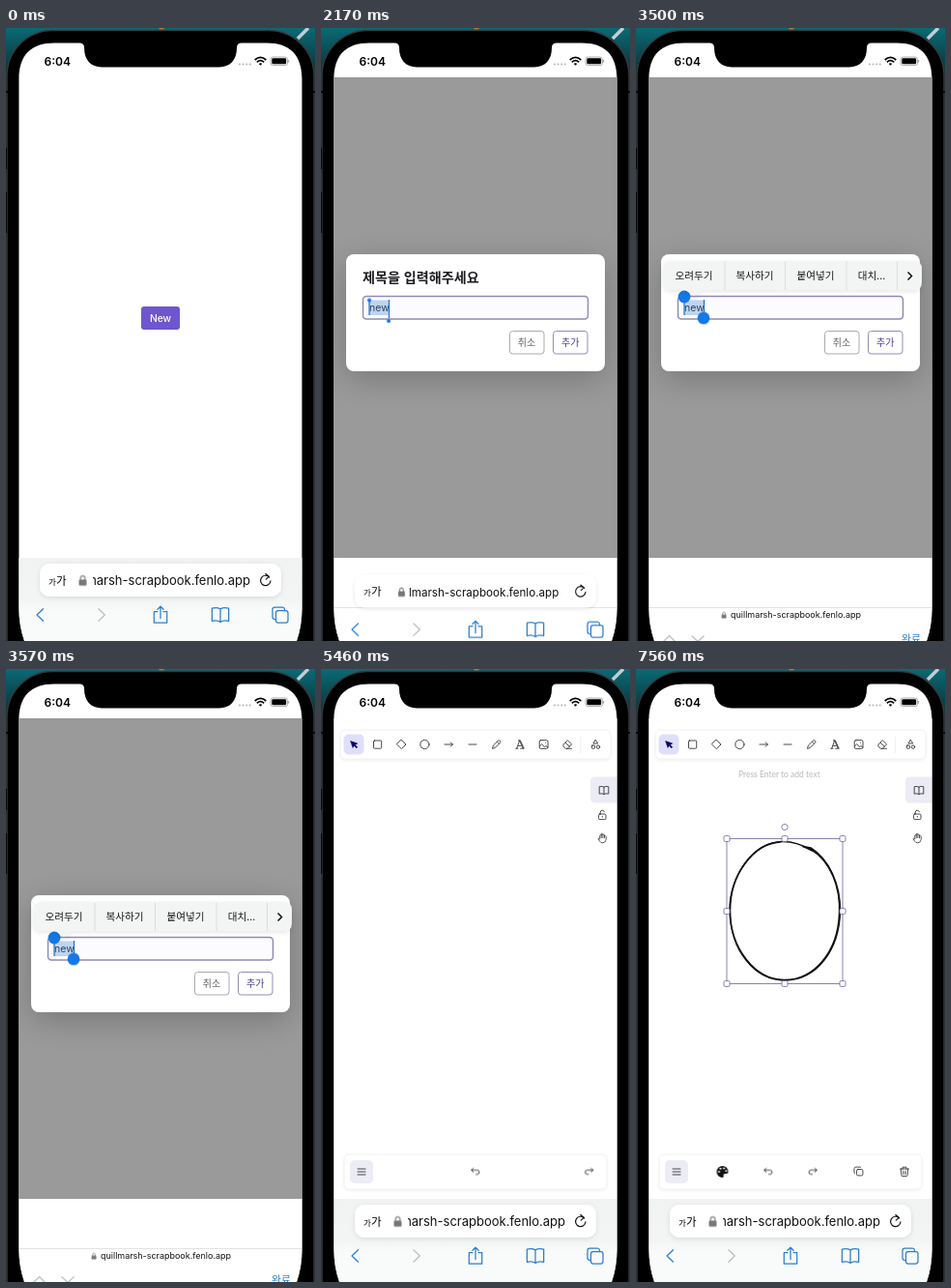
Recreate the animation shown at these times as an HTML page. Size 320 by 634 pixels, loop 8 s.

```html
<!DOCTYPE html>
<html lang="ko">
<head>
<meta charset="utf-8">
<title>Notebook demo</title>
<style>
  html, body { margin: 0; width: 100%; height: 100%; overflow: hidden; background: #000; }
  svg { display: block; width: 100vw; height: 100vh; }
  text { font-family: Inter, "Noto Sans CJK KR", "Noto Sans CJK", sans-serif; }
  .ko { font-family: "Noto Sans CJK KR", "Noto Sans CJK", sans-serif; }
  .mid { text-anchor: middle; }
  .line { fill: none; stroke: #2a2a30; stroke-width: .85; stroke-linecap: round; stroke-linejoin: round; }
  .nav { fill: none; stroke: #2a7fd0; stroke-width: 1.25; stroke-linecap: round; stroke-linejoin: round; }

  .anim { animation: 8s linear infinite; }
  .hard { animation: 8s step-end infinite; }

  /* page and dialog */
  .app { animation-name: app; }
  .modal { animation-name: modal; }
  .panel { animation-name: panel; transform-origin: 160px 295px; }
  .pick { animation-name: pick; }
  .grip { animation-name: grip; }
  .menu { animation-name: menu; }
  @keyframes app { 0% { opacity: 0 } 47.25%, 100% { opacity: 1 } }
  @keyframes modal { 0%, 21.875% { opacity: 0 } 24.5%, 44.7% { opacity: 1 } 47.25%, 100% { opacity: 0 } }
  @keyframes panel { 0%, 21.875% { transform: scale(.96) } 24.5%, 100% { transform: none } }
  @keyframes pick { 0% { opacity: 0 } 26.25%, 100% { opacity: 1 } }
  @keyframes grip { 0%, 27.2% { transform: scale(.31) } 31%, 100% { transform: none } }
  @keyframes menu { 0%, 35% { opacity: 0 } 37.5%, 44.7% { opacity: 1 } 45.5%, 100% { opacity: 0 } }

  /* browser bars: 25.75% - 31% collapse, 45% - 48.1% return */
  .plain { animation-name: plain; }
  .field { animation-name: field; }
  .tint { animation-name: tint; }
  .url { animation-name: url; }
  .lock { animation-name: lock; }
  .tools { animation-name: tools; }
  .keys { animation-name: keys; }
  .bar { animation-timing-function: cubic-bezier(.3, .3, .6, 1); }
  @keyframes plain { 0%, 23% { opacity: 0 } 25.75%, 45% { opacity: 1 } 48.1%, 100% { opacity: 0 } }
  @keyframes field { 0%, 25.75%, 48.1%, 100% { transform: none } 31%, 45% { transform: translateY(34px) } }
  @keyframes tint { 0%, 27%, 48.1%, 100% { opacity: 1 } 30%, 45.5% { opacity: 0 } }
  @keyframes url {
    0%, 25.75%, 48.1%, 100% { transform: translate(253px, 576px) }
    31%, 45% { transform: translate(233px, 610.3px) scale(.69) }
  }
  @keyframes lock {
    0%, 25.75%, 48.1%, 100% { transform: translate(79.5px, 571.5px) }
    31%, 45% { transform: translate(91px, 607.3px) scale(.62) }
  }
  @keyframes tools { 0%, 25.75%, 48.1%, 100% { transform: none } 31%, 45% { transform: translateY(45px) } }
  @keyframes keys { 0%, 25.75%, 48.1%, 100% { transform: translateY(34px) } 31%, 45% { transform: none } }

  /* drawing */
  .active { animation-name: active; }
  .undo { animation-name: undo; }
  .redo { animation-name: redo; }
  .palette { animation-name: palette; }
  .chosen { animation-name: chosen; }
  .shape { animation-name: shape; }
  .shape path { vector-effect: non-scaling-stroke; }
  @keyframes active { 0% { transform: none } 74.375% { transform: translateX(73px) } 84%, 100% { transform: none } }
  @keyframes undo {
    0% { transform: translate(160px, 519.5px) }
    74.375% { transform: translate(198px, 519.5px) }
    84%, 100% { transform: translate(137px, 519.5px) }
  }
  @keyframes redo { 0% { transform: translate(277.5px, 519.5px) } 84%, 100% { transform: translate(183px, 519.5px) } }
  @keyframes palette {
    0% { opacity: 0; transform: translate(119px, 520px) }
    74.375% { opacity: 1; transform: translate(119px, 520px) }
    84%, 100% { opacity: 1; transform: translate(89.5px, 520px) }
  }
  @keyframes chosen { 0% { opacity: 0 } 84%, 100% { opacity: 1 } }
  @keyframes shape {
    0%, 80.4% { opacity: 0; transform: translate(95px, 177px) scale(.03) }
    80.5% { opacity: 1; transform: translate(95px, 177px) scale(.05) }
    83.5%, 100% { opacity: 1; transform: translate(95px, 177px) }
  }
</style>
</head>
<body>
<svg viewBox="0 0 320 634" preserveAspectRatio="none">
  <defs>
    <clipPath id="screen">
      <path d="M19 634Q13.4 618 13.4 600V53C13.4 28 26 15.6 50 15.6H76Q81 15.6 81 20.5C81 33 88 40.4 99 40.4H221C232 40.4 239 33 239 20.5Q239 15.6 244 15.6H270C294 15.6 306.5 28 306.5 53V600Q306.5 618 301 634Z"/>
    </clipPath>
    <clipPath id="urlClip"><path d="M90 550H260V634H90Z"/></clipPath>
    <clipPath id="page"><path d="M13 51H307V548H13Z"/></clipPath>
    <linearGradient id="wall" x2="0" y2="1">
      <stop stop-color="#0a6a75"/><stop offset=".04" stop-color="#0b4a53"/><stop offset=".1" stop-color="#0a1c20"/>
    </linearGradient>
    <linearGradient id="dock" x2="0" y2="1">
      <stop stop-color="#f1f3f3"/><stop offset=".5" stop-color="#f3f5f5"/><stop offset=".65" stop-color="#f9fafa"/>
    </linearGradient>
    <filter id="soft" x="-30%" y="-60%" width="160%" height="220%"><feGaussianBlur stdDeviation="16"/></filter>
    <filter id="lift" x="-10%" y="-40%" width="120%" height="190%">
      <feDropShadow dx="0" dy="1.5" stdDeviation="2.5" flood-opacity=".1"/>
    </filter>
    <filter id="faint" x="-10%" y="-40%" width="120%" height="190%">
      <feDropShadow dx="0" dy="1.5" stdDeviation="1.5" flood-opacity=".05"/>
    </filter>
    <path id="book" d="M0-3.4Q-2-4.6-4.8-3.8V3.6Q-2 2.8 0 4.1Q2 2.8 4.8 3.6V-3.8Q2-4.6 0-3.4V4"/>
    <path id="back" d="M-2.2-3.2L-4.2-1.2L-2.2.8M-4.2-1.2H1.8Q4-1 4 1Q3.9 3 1.8 3.1H.6"/>
  </defs>

  <!-- wallpaper and phone body -->
  <rect width="320" height="634" fill="url(#wall)"/>
  <path d="M158 0H164L163 1.5H159Z" fill="#b07a45"/>
  <path d="M302 11L313 0" stroke="#c3cdd2" stroke-width="3.5"/>
  <rect x="1" y="2.5" width="318" height="760" rx="47" fill="#000" stroke="#37393b" stroke-width="1.4"/>
  <path d="M0 66H2M0 124V146M0 170V212M320 66H318" stroke="#050607" stroke-width="2"/>

  <g clip-path="url(#screen)">
    <rect width="320" height="634" fill="#fff"/>

    <!-- start page -->
    <rect x="140" y="288" width="40" height="24" rx="3" fill="#6e56cf"/>
    <text class="mid" x="160" y="303.7" font-size="10.3" font-weight="500" fill="#fff">New</text>

    <!-- drawing page -->
    <g class="hard app">
      <rect x="13" y="51" width="294" height="497" fill="#fff"/>
      <g fill="#fff" stroke="#ededf0" stroke-width=".8" filter="url(#faint)">
        <rect x="20" y="63" width="280" height="30" rx="5"/>
        <rect x="24" y="502" width="272" height="36" rx="5"/>
      </g>
      <rect class="hard active" x="23.5" y="67.5" width="21" height="21" rx="5" fill="#e0dffa"/>
      <path d="M268.5 70V87" stroke="#ececf1" stroke-width=".8"/>
      <path d="M30.6 74.6L33 81.4L34.4 79.2L36.7 81.8L37.7 80.8L35.3 78.4L37.7 77Z" fill="#0a0764" stroke="#0a0764" stroke-width=".6" stroke-linejoin="round"/>
      <g class="line">
        <rect x="54.5" y="74" width="8.2" height="8.2" rx="1"/>
        <path d="M83.3 73.4L88 78L83.3 82.6L78.6 78Z"/>
        <circle cx="107.4" cy="78" r="4.6"/>
        <path d="M128 78H136.4M134.2 75.8L136.4 78L134.2 80.2"/>
        <path d="M153 78H161"/>
        <path d="M177.6 82L178.4 79L183.7 73.9Q184.8 73.4 185.6 74.4Q186.3 75.3 185.6 76.2L180.4 81.2ZM182.5 75.2L184.4 77.1"/>
        <path d="M201.8 82.2H204M206.6 82.2H210.2M202.8 82L205.6 74L209.2 82M204.2 79.4H207.2M204.4 73.8H206.4L209.8 81.6"/>
        <rect x="226.2" y="73.6" width="8.8" height="8.8" rx="1.6"/>
        <path d="M226.3 80L228.7 77.7L231.6 80.8L232.8 79.4L235 81.2M232.4 76.2h.1"/>
        <path d="M255 82.3H259.5M253.4 82.3L251 79.9Q250.3 79 251 78.2L255.4 73.9L259.6 77.8L255.4 82.2ZM253 76.2L257.4 80.2"/>
        <path d="M284.5 73.4L286.7 77H282.3Z"/>
        <rect x="280.4" y="79" width="3.2" height="3.2" rx=".6"/>
        <circle cx="287" cy="80.6" r="1.7"/>
      </g>

      <path d="M307 111.5H284Q279 111.5 279 116.5V133.5Q279 138.5 284 138.5H307Z" fill="#ececf4"/>
      <g class="line">
        <use href="#book" x="293" y="125.5"/>
        <rect x="287.6" y="150" width="7.4" height="5.6" rx="1.2"/>
        <path d="M289.2 150V148.2Q289.4 146.3 291.3 146.2Q293 146.3 293.4 147.7M291.3 152.4v.8"/>
        <path stroke-width=".75" d="M288.8 175.6V172Q289.6 171 290.3 172V174.6M290.3 172V170.6Q291.1 169.6 291.9 170.6V174.6M291.9 171.4Q292.8 170.6 293.5 171.6V174.8M293.5 172.8Q294.5 172 295.2 173.2V176.4Q294.8 179.8 291.6 179.8Q289.6 179.8 288.5 178L286.9 175.6Q287.2 174.2 288.8 176"/>
      </g>

      <rect x="30" y="508" width="24" height="24" rx="5" fill="#ececf4"/>
      <g class="line">
        <path d="M38 517H46M38 520H46M38 523H46"/>
        <use class="hard undo" href="#back"/>
        <g class="hard redo"><use href="#back" transform="scale(-1 1)"/></g>
      </g>
      <g class="hard palette">
        <path d="M0-6A6 6 0 1 0 0 6Q1.7 5.8 1.2 4Q.9 2.2 2.6 2.1H4.2Q6 2 6-.2Q5.4-5.7 0-6Z" fill="#111"/>
        <g fill="#fff"><circle cx="-3.5" r="1"/><circle cx="-2" cy="-3.2" r="1"/><circle cx="1.6" cy="-3.4" r="1"/><circle cx="3.8" cy="-.8" r=".9"/></g>
      </g>

      <g class="anim shape" fill="none" stroke="#111" stroke-width="1.5" stroke-linecap="round">
        <path d="M88 11C78 5 68 1.500 57 1.500C26 2 2.500 36 2.500 73C2.500 114 28 145 59 145C92 145 115.500 114 116.500 73C116.500 45 105 20 86 8L78 6.500"/>
        <path d="M78 6.500L88 11M54 2C26 4 2 37 2 73C3 112 28 144 58 144.500C89 145 114 116 115.500 76C117 48 106 22 87 10"/>
      </g>

      <g class="hard chosen">
        <text x="106" y="111.6" font-size="8.5" fill="#b9b9bd" style="font-family:Lato,sans-serif">Press Enter to add text</text>
        <g fill="none" stroke="#6a679c" stroke-width=".8">
          <rect x="94" y="175.5" width="120" height="150"/>
          <g id="knobs" fill="#fff"><circle cx="154" cy="163.5" r="3.1"/></g>
        </g>
        <g class="line">
          <rect x="228.5" y="517.5" width="6.4" height="6.4" rx="1.3"/>
          <path d="M226.6 522Q226 521.6 226 520.8V516.4Q226.2 515.2 227.4 515.1H231.8Q232.6 515.2 232.8 515.7"/>
          <path d="M273.6 517H282.4M276.9 519.3V522.7M279.1 519.3V522.7M274.3 517L274.9 523.6Q275.1 524.6 276 524.6H280Q280.9 524.6 281.1 523.6L281.7 517M276.2 517V515.2H279.8V517"/>
        </g>
      </g>
    </g>

    <!-- title dialog -->
    <g class="anim modal">
      <rect x="13" y="51" width="294" height="497" fill="#9a9a9a"/>
      <g clip-path="url(#page)">
        <rect x="26" y="242" width="268" height="121" rx="10" opacity=".22" filter="url(#soft)"/>
      </g>
      <g class="anim panel">
        <rect x="26" y="234" width="268" height="121" rx="8" fill="#fff"/>
        <text class="ko" x="43" y="263" font-size="14.1" font-weight="700" fill="#1c1c20">제목을 입력해주세요</text>
        <rect x="43.5" y="277.5" width="233" height="23.5" rx="3.5" fill="#fcfbff" stroke="#918bb5" stroke-width="1.5"/>
        <rect class="hard pick" x="50" y="281.5" width="21" height="15.5" fill="#bcd5f1"/>
        <text x="50" y="292.8" font-size="10.5" fill="#34405e">new</text>
        <g fill="#fff">
          <rect x="195.5" y="313.5" width="35.5" height="23.5" rx="3" stroke="#aaaab0"/>
          <rect x="240.5" y="313.5" width="35.5" height="23.5" rx="3" stroke="#938cba"/>
        </g>
        <g font-size="10" class="mid">
          <text class="ko" x="213" y="328.8" fill="#606066">취소</text>
          <text class="ko" x="258.3" y="328.8" fill="#4b3f94" font-weight="500">추가</text>
        </g>
        <g class="hard pick" fill="#1478e6">
          <path d="M50 281V297M70.5 281V300" stroke="#2b74c4" stroke-width="1.3"/>
          <g transform="translate(50 283)"><circle class="anim grip" cy="-5" r="6.4"/></g>
          <g transform="translate(70 304.3)"><circle class="anim grip" cy="-4.3" r="6.4"/></g>
        </g>
        <g class="anim menu">
          <path d="M36 241H288Q296 241 296 249V263Q296 271 288 271H68L60 277L52 271H36Q28 271 28 263V249Q28 241 36 241Z" fill="#f3f4f4" filter="url(#lift)"/>
          <path d="M92 241.5V271M154.5 241.5V271M218 241.5V271M270.5 241.5V271" stroke="#dcdddd"/>
          <g class="mid" font-size="10.6" font-weight="500" fill="#161616">
            <text class="ko" x="60" y="260.2">오려두기</text>
            <text class="ko" x="123" y="260.2">복사하기</text>
            <text class="ko" x="186" y="260.2">붙여넣기</text>
            <text class="ko" x="244" y="260.2">대치...</text>
          </g>
          <path d="M281.5 252.5L285.5 256.5L281.5 260.5" fill="none" stroke="#111" stroke-width="1.5"/>
        </g>
      </g>
    </g>

    <!-- browser bars -->
    <rect x="13" y="548" width="294" height="86" fill="url(#dock)"/>
    <g class="anim plain">
      <rect x="13" y="548" width="294" height="86" fill="#fff"/>
      <path d="M13 599.5H307" stroke="#e2e4e4"/>
    </g>
    <g class="anim tint">
      <g class="anim bar field">
        <rect x="35" y="554" width="250" height="34" rx="10" fill="#fff" filter="url(#lift)"/>
        <text class="ko" x="44" y="575.5" font-size="8.5" font-weight="500">가</text>
        <text class="ko" x="52" y="575.5" font-size="11.5" font-weight="500">가</text>
        <path d="M272.7 568A5.2 5.2 0 1 0 274 571.8M268.8 564.6L272.3 567.2L269.3 570.2" fill="none" stroke="#151515" stroke-width="1.2" stroke-linecap="round" stroke-linejoin="round"/>
      </g>
    </g>
    <g class="anim bar lock" fill="#77787a">
      <rect x="-4" y="-1" width="8" height="6.3" rx="1.2"/>
      <path d="M-2.3-.5V-2.6Q-2.1-4.9 0-5Q2.1-4.9 2.3-2.6V-.5" fill="none" stroke="#77787a" stroke-width="1.2"/>
    </g>
    <g clip-path="url(#urlClip)">
      <text class="anim bar url" font-size="13" text-anchor="end" fill="#111">quillmarsh-scrapbook.fenlo.app</text>
    </g>
    <g class="anim bar tools">
      <g class="nav">
        <path d="M38.5 600.8L32 607L38.5 613.2"/>
        <path d="M95.8 600.8L102.3 607L95.8 613.2" stroke="#bcbfc2"/>
        <path d="M157 603.6H153.3V615.2H166.7V603.6H163M160 610.5V598.4M156.9 601.3L160 598.2L163.1 601.3"/>
        <use href="#book" transform="translate(222 607) scale(1.8)" stroke-width=".7"/>
        <rect x="279.5" y="602.5" width="12.5" height="12.5" rx="2.2"/>
        <path d="M279.5 611.5H278.2Q276 611.3 276 609.3V601.2Q276.2 599 278.2 599H286.3Q288.4 599.2 288.5 601.2V602.5"/>
      </g>
    </g>
    <g class="anim bar keys">
      <path d="M28.5 634.5L34.5 628.5L40.5 634.5M57.5 628.5L64 634.5L70.5 628.5" fill="none" stroke="#c3c5c7" stroke-width="1.5"/>
      <text class="ko" x="275" y="636" font-size="10.8" font-weight="500" fill="#2a7fd0">완료</text>
    </g>

    <!-- status bar -->
    <text x="39.6" y="38.6" font-size="12" font-weight="600">6:04</text>
    <g fill="#b4b4b4"><circle cx="242" cy="37.5" r="1"/><circle cx="245.6" cy="37.5" r="1"/><circle cx="249.2" cy="37.5" r="1"/><circle cx="252.8" cy="37.5" r="1"/></g>
    <g fill="none" stroke="#000" stroke-width="1.7">
      <path d="M257.7 33Q263.5 27.8 269.3 33M259.8 35.3Q263.5 32 267.2 35.3"/>
      <path d="M263.5 38.8L261.7 37Q263.5 35.5 265.3 37Z" fill="#000" stroke="none"/>
    </g>
    <rect x="274" y="30" width="17.5" height="8.6" rx="2.5" fill="none" stroke="#9a9a9a" stroke-width=".8"/>
    <rect x="275.3" y="31.3" width="14.9" height="6" rx="1.4"/>
    <path d="M292.7 33V35.7" stroke="#9a9a9a"/>
  </g>
</svg>
<script>
  // Selection knobs: corners and edge midpoints of the box.
  const knobs = document.getElementById('knobs');
  for (const x of [94, 154, 214]) {
    for (const y of [175.5, 250.5, 325.5]) {
      if (x === 154 && y === 250.5) continue;
      const knob = document.createElementNS('http://www.w3.org/2000/svg', 'rect');
      const box = { x: x - 3, y: y - 3, width: 6, height: 6, rx: 1.5 };
      for (const key in box) knob.setAttribute(key, box[key]);
      knobs.append(knob);
    }
  }
</script>
</body>
</html>
```
